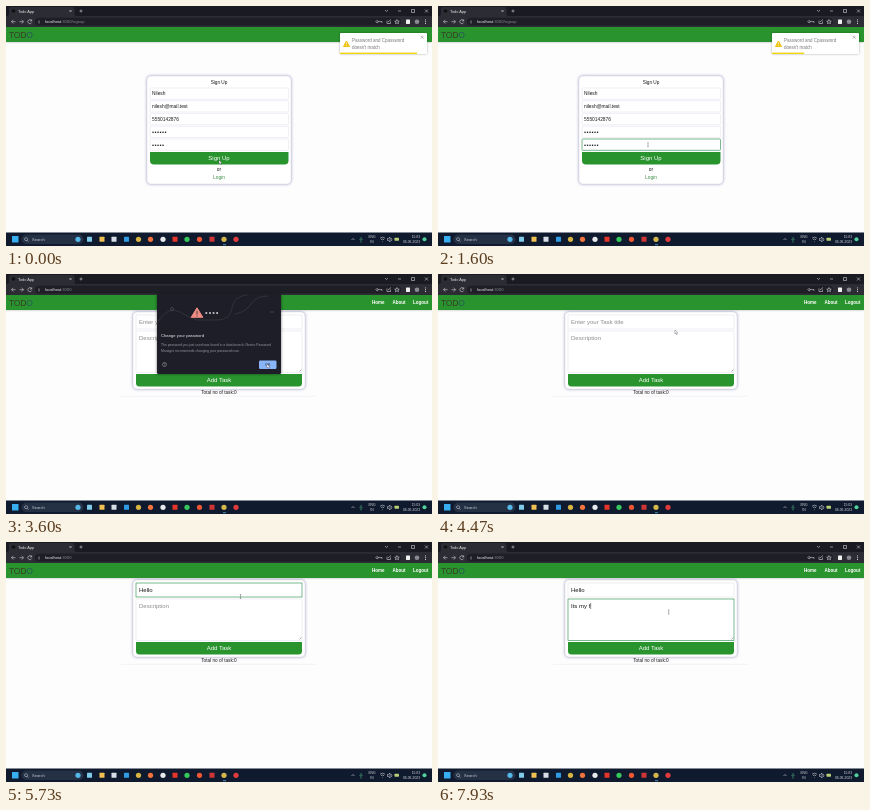
An HTML page that plays this animation: 426x240 px, repeating every 8 s.

```html
<!DOCTYPE html>
<html lang="en">
<head>
<meta charset="utf-8">
<title>Todo App</title>
<style>
  html, body { margin: 0; width: 100%; height: 100%; overflow: hidden; background: #fdfdfe; }
  svg { display: block; width: 100vw; height: 100vh; }
  text { font: 4.85px "Liberation Sans", Arial, sans-serif; fill: #181818; white-space: pre; }
  .mid { text-anchor: middle; }
  .end { text-anchor: end; }
  .big { font-size: 6px; }
  .hint { fill: #8c8c8c; }
  .dots { font-size: 6px; letter-spacing: .4px; }
  .white { fill: #fff; }
  .nav { font-size: 4.5px; font-weight: bold; fill: #fff; }
  .tiny { font-size: 3.35px; fill: #d5d8dc; }
  .card { fill: #fff; stroke: #d0d0dc; stroke-width: .4; filter: drop-shadow(0 .6px 1.5px #64649e99); }
  .field { fill: #fff; stroke: #e4e4ee; stroke-width: .6; }
  .focus { stroke: #3f9a60; stroke-width: .7; }
  .green { fill: #29932e; }
  .line { fill: none; stroke: #d0d2d8; stroke-width: .6; }
</style>
</head>
<body>
<svg viewBox="0 0 426 240" preserveAspectRatio="none">
  <rect width="426" height="240" fill="#fdfdfe"/>

  <!-- page header -->
  <rect y="21" width="426" height="15" class="green" style="filter:drop-shadow(0 .5px 1px #6668)"/>
  <text x="3" y="32" style="font-size:8.500px;letter-spacing:-.2px"><tspan fill="#34402a">T</tspan><tspan fill="#33432c">O</tspan><tspan fill="#3c3a20">D</tspan><tspan fill="#245a58">O</tspan></text>

  <g id="signup">
    <rect class="card" x="141" y="70" width="144" height="108" rx="4"/>
    <text class="mid" x="213" y="78" style="font-size:4.700px">Sign Up</text>
    <g id="fields"></g>
    <text x="146" y="89">Nilesh</text>
    <text x="146" y="101.800">nilesh@mail.test</text>
    <text x="146" y="114.500">5550142876</text>
    <text class="dots" x="146" y="128.200">••••••</text>
    <text class="dots" x="146" y="141.100" id="confirm"></text>
    <path class="green" d="M144 146H282.500V154.500Q282.500 158.500 278.500 158.500H148Q144 158.500 144 154.500Z"/>
    <text class="mid big white" x="213" y="154.300">Sign Up</text>
    <text class="mid" x="213" y="165">or</text>
    <text class="mid" x="213" y="173" style="fill:#3c8c48">Login</text>

    <rect x="334" y="27" width="87" height="21" rx="1" fill="#fff" style="filter:drop-shadow(0 .4px 1.3px #0005)"/>
    <path d="M340.500 35L343.500 40.500H337.500Z" fill="#f1c40f" stroke="#f1c40f" stroke-linejoin="round"/>
    <path d="M340.500 36.500V38.500M340.500 39.300V40" stroke="#fff" stroke-width=".6"/>
    <text x="346" y="36.300" style="font-size:4.500px;fill:#777">Password and Cpassword</text>
    <text x="346" y="43" style="font-size:4.500px;fill:#777">doesn't match</text>
    <path class="line" d="M415 30L417.500 32.500M417.500 30L415 32.500" style="stroke:#888"/>
    <rect id="timer" x="334" y="46.600" height="1.400" fill="#f0d60f"/>
  </g>

  <g id="todo">
    <text class="nav" x="366" y="30">Home</text>
    <text class="nav" x="386.500" y="30">About</text>
    <text class="nav" x="407" y="30">Logout</text>
    <rect class="card" x="127" y="38" width="172" height="77" rx="4"/>
    <rect class="field" id="titleBox" x="130" y="41" width="166" height="14"/>
    <rect class="field" id="notesBox" x="130" y="57" width="166" height="41.500"/>
    <path class="line" d="M293.500 97.500L295.500 95.500" style="stroke:#777"/>
    <text class="big" id="title" x="133" y="50"></text>
    <text class="big" id="notes" x="133" y="65.800"></text>
    <path class="green" d="M130 100H296V109Q296 112.500 292.500 112.500H133.500Q130 112.500 130 109Z"/>
    <text class="mid big white" x="213" y="108.200">Add Task</text>
    <text class="mid" x="213" y="120" style="font-size:4.700px">Total no of task:0</text>
    <path d="M115 122.300H310" stroke="#e6e6ee" stroke-width=".5"/>
  </g>

  <!-- browser frame -->
  <rect width="426" height="21" fill="#2c2d34"/>
  <path d="M0 0H426V10H70Q68.500 10 68.500 8V3Q68.500 1 66.500 1H5Q3 1 3 3V8Q3 10 1 10H0Z" fill="#191a22"/>
  <circle cx="7.500" cy="5" r="1.800" fill="#101010"/>
  <text x="12" y="6.500" style="font-size:3.900px;fill:#e6e6e6">Todo App</text>
  <rect x="29" y="11.800" width="366" height="7.800" rx="3.900" fill="#1e1f26"/>
  <text x="39" y="17.200" style="font-size:4.100px;fill:#f1f1f1">localhost<tspan id="path" fill="#85898f"></tspan></text>
  <path class="line" d="M63.500 4L65.500 6M65.500 4L63.500 6M73.500 5H76.500M75 3.500V6.500
    M379 4L380.500 5.500L382 4M392 5H395M405.500 3.500H408.500V6.500H405.500ZM419 3.500L422 6.500M422 3.500L419 6.500
    M9.500 15.700H5.500L7.300 13.900M5.500 15.700L7.300 17.500M13.500 15.700H17.500L15.700 13.900M17.500 15.700L15.700 17.500
    M25.500 14.500A2 2 0 1 0 25.700 16.500M25.700 13.300V15H24M33 14.500V17.500
    M372 15.700A1 1 0 1 1 372 15.600H376V17M381 14.500V17.500H384.500V15.500M382 16L385 13.500
    M391 13.500L391.700 15.200H393.300L392 16.200L392.600 17.800L391 16.800L389.400 17.800L390 16.200L388.700 15.200H390.300Z"/>
  <rect x="400" y="13.500" width="4" height="4.400" rx=".4" fill="#f0f0f0"/>
  <circle cx="411" cy="15.700" r="2.300" fill="#888c92"/>
  <path d="M419.500 13.500V18" stroke="#ddd" stroke-dasharray=".9 .9"/>

  <g id="dialog">
    <rect x="151" y="20" width="124" height="80" rx="1.500" fill="#1e1e28" style="filter:drop-shadow(0 .5px 1.5px #0008)"/>
    <path d="M151 49Q162 31 174 38T192 46H211Q224 46 226 34T241 21M229 40Q240 38 245 30T262 22" fill="none" stroke="#44464c" stroke-width=".5"/>
    <circle cx="166" cy="35" r="1.500" fill="none" stroke="#565960" stroke-width=".6"/>
    <path d="M264 38H268" stroke="#565960" stroke-width=".6"/>
    <path d="M191 33.800L196.800 43.300H185.200Z" fill="#ee8d83" stroke="#ee8d83" stroke-linejoin="round"/>
    <path d="M191 37V40.500M191 41.500V42.500" stroke="#292a2d" stroke-width=".8"/>
    <path d="M199.500 39H212" stroke="#eee" stroke-width="1.700" stroke-dasharray="1.700 1.900"/>
    <text x="155" y="62.700" style="font-size:4.200px;fill:#f1f3f4">Change your password</text>
    <text class="tiny" x="155" y="72" style="fill:#9498a0">The password you just used was found in a data breach. Nestro Password</text>
    <text class="tiny" x="155" y="78" style="fill:#9498a0">Manager recommends changing your password now.</text>
    <circle cx="158.500" cy="90.500" r="2" class="line" style="stroke:#999"/>
    <text class="mid tiny" x="158.500" y="91.700" style="fill:#aaa">?</text>
    <rect x="253" y="86.500" width="17.500" height="8.500" rx="1.200" fill="#8ab4f8"/>
    <text class="mid" x="261.800" y="92" style="font-size:3.600px;fill:#202124">OK</text>
  </g>

  <!-- taskbar -->
  <rect y="226.500" width="426" height="13.500" fill="#0f1a2e"/>
  <rect x="6" y="230" width="6.500" height="6.500" fill="#36aef0"/>
  <rect x="15.500" y="228.500" width="62" height="9.500" rx="4.750" fill="#243044"/>
  <path class="line" d="M20 231.700A1.500 1.500 0 1 0 20.100 231.700M21.200 234.300L22.500 235.500"/>
  <text x="26" y="234.800" style="font-size:4px;fill:#c9d0d8">Search</text>
  <g id="apps"></g>
  <path d="M217 238.700H220" stroke="#65bdf1" stroke-width=".7"/>
  <path class="line" d="M345.500 234L347 232.500L348.500 234
    M374 232.200Q376.500 230 379 232.200M375 233.700Q376.500 232.400 378 233.700M376.500 235V235.600
    M381.500 232.500H382.500L384 231V236L382.500 234.500H381.500ZM385.200 232Q386.500 233.500 385.200 235"/>
  <path class="line" d="M355 231V233.500M353.500 233Q355 236 356.500 233M355 235V236.500" style="stroke:#58c98b"/>
  <rect x="388.500" y="231.700" width="4.500" height="3" rx=".6" fill="#b9cf78"/>
  <text class="mid tiny" x="366" y="232.300">ENG</text>
  <text class="mid tiny" x="366" y="237">IN</text>
  <text class="end tiny" x="414" y="232.300">15:03</text>
  <text class="end tiny" x="414" y="237">06-06-2023</text>
  <circle cx="418.500" cy="233.300" r="2" fill="#4fd39a"/>

  <path id="caret" stroke="#222" stroke-width=".5"/>
  <path id="arrow" d="M0 0V4L.9 3.200L1.600 4.600L2.300 4.300L1.600 2.900H2.800Z" fill="#fff" stroke="#445" stroke-width=".35"/>
  <path id="beam" d="M-.7 -2H.7M0 -2V2M-.7 2H.7" fill="none" stroke="#555" stroke-width=".45"/>
</svg>
<script>
const LOOP = 8000;
const $ = id => document.getElementById(id);
const show = (id, on) => $(id).style.display = on ? "" : "none";

$("fields").innerHTML = [82, 94.7, 107.4, 120.2, 133].map((y, i) =>
  `<rect class="field" id="field${i}" x="144" y="${y}" width="138.500" height="11.300" rx=".8"/>`).join("");

// Taskbar apps: plain marks, [x, colour, square?]
$("apps").innerHTML = [
  [72, "#54b7e8"], [83.500, "#80cbe9", 1], [96, "#f0c052", 1], [108, "#d6dde5", 1],
  [120.500, "#2f9be2", 1], [132.500, "#d9b443"], [144.500, "#f2733b"], [157, "#e6eaed"],
  [169, "#e53429", 1], [181, "#37c85d"], [193.500, "#ef5734"], [206, "#cf3535", 1],
  [218, "#d5b84d"], [230, "#df3b3b"]
].map(([x, fill, square]) => square
  ? `<rect x="${x - 2.500}" y="230.800" width="5" height="5" rx=".5" fill="${fill}"/>`
  : `<circle cx="${x}" cy="233.300" r="2.600" fill="${fill}"/>`).join("");

// Pointer stops: [time, x, y]
const stops = [
  [0, 213, 154], [120, 213, 154], [600, 210, 138.700], [1650, 210, 138.700], [2050, 206, 153.500],
  [2900, 206, 153.500], [3500, 261, 90], [3750, 261, 90], [4350, 237, 56],
  [4550, 237, 56], [4850, 234.500, 54.500], [5850, 234.500, 54.500], [6300, 230.700, 70], [LOOP, 230.700, 70]
];

function pointerAt(t) {
  const i = stops.findIndex(s => s[0] > t);
  const [t0, x0, y0] = stops[i - 1], [t1, x1, y1] = stops[i];
  const p = (t - t0) / (t1 - t0), ease = p * p * (3 - 2 * p);
  return [x0 + (x1 - x0) * ease, y0 + (y1 - y0) * ease];
}

const typed = (text, t, start, step) =>
  text.slice(0, Math.max(0, Math.floor((t - start) / step) + 1));

function fill(id, value, hint) {
  $(id).textContent = value || hint;
  $(id).classList.toggle("hint", !value);
}

function placeCaret(id, value, focusTime, t) {
  const on = (t - focusTime) % 1060 < 530;
  show("caret", on);
  if (!on) return;
  const node = $(id), y = +node.getAttribute("y");
  const x = 133.3 + (value ? node.getComputedTextLength() : 0);
  $("caret").setAttribute("d", `M${x} ${y - 5}V${y + 1.2}`);
}

function draw(t) {
  const signup = t < 2330;
  const confirmFocus = t >= 600 && t < 2050;
  const titleFocus = t >= 4900 && t < 6400, notesFocus = t >= 6400;
  const title = typed("Hello", t, 5050, 120);
  const notes = typed("Its my f", t, 7000, 125);

  show("signup", signup);
  show("todo", !signup);
  show("dialog", t >= 2550 && t < 3680);
  $("path").textContent = signup ? ":3000/signup" : ":3000";

  $("confirm").textContent = "•".repeat(t < 1050 ? 5 : 6);
  $("timer").setAttribute("width", Math.max(0, 77 - t * .028));
  $("field4").classList.toggle("focus", confirmFocus);
  $("titleBox").classList.toggle("focus", titleFocus);
  $("notesBox").classList.toggle("focus", notesFocus);
  fill("title", title, "Enter your Task title");
  fill("notes", notes, notesFocus ? "" : "Description");

  if (notesFocus) placeCaret("notes", notes, notes ? t : 6400, t);
  else if (titleFocus && t < 5650) placeCaret("title", title, title ? t : 4900, t);
  else show("caret", false);

  const [x, y] = pointerAt(t);
  const beam = signup ? y < 145 : t >= 4700;
  show("beam", beam);
  show("arrow", !beam);
  $(beam ? "beam" : "arrow").setAttribute("transform", `translate(${x} ${y})`);
}

function tick() {
  draw(performance.now() % LOOP);
  requestAnimationFrame(tick);
}
tick();
</script>
</body>
</html>
```
